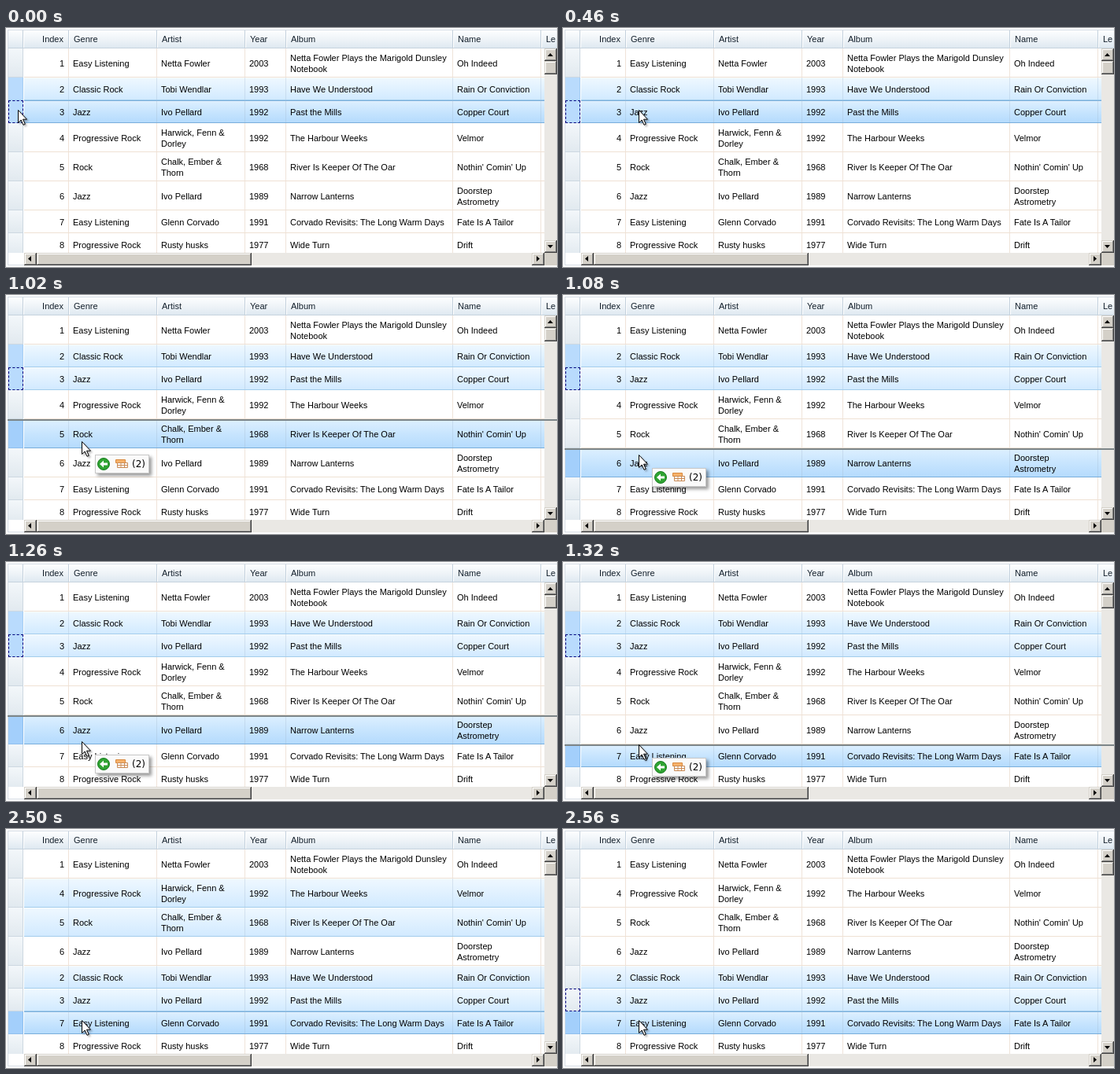
An HTML page for the animation above (3.29 s loop, 700 by 304 pixels).

```html
<!DOCTYPE html>
<html lang="en">
<head>
<meta charset="utf-8">
<title>Drag rows in a grid</title>
<style>
html, body { margin: 0; width: 100%; height: 100%; overflow: hidden; background: #fff; }
body { position: relative; font: 11px/14px "Liberation Sans", Arial, sans-serif; color: #000; }
div, span, svg { position: absolute; box-sizing: border-box; }
#frame { left: 2px; top: 2px; width: 698px; height: 300px; border: solid #d5dce4; border-width: 1px 0 1px 1px; }
#head { left: 3px; top: 3px; width: 697px; height: 23px; overflow: hidden;
  background: linear-gradient(#fdfeff, #eff4f8 50%, #dfe9f1); border-bottom: 1px solid #c6d3de; }
#head span { top: 4px; color: #14202c; }
#head i { position: absolute; top: 0; width: 2px; height: 22px; background: linear-gradient(90deg, #c3d0dc 50%, #fff 50%); }
#rows { left: 3px; top: 26px; width: 681px; height: 260px; overflow: hidden; }
.row { left: 0; width: 681px; border-bottom: 1px solid #efe1d4; }
.row span { top: 1px; bottom: -1px; display: flex; align-items: center; white-space: pre; }
.row i { position: absolute; top: 0; bottom: 0; width: 1px; background: #efe3d9; }
.sel i, .hot i, .down i { background: #a0b4c84d; }
.tab { left: 0; top: 0; bottom: -1px; width: 20px; border-right: 1px solid #fff;
  background: linear-gradient(#f3f7fa, #e1e9ef); box-shadow: inset -1px -1px #cdd8e1; }
.sel { background: linear-gradient(#eff8ff, #d2eaff); border-color: #a3cdec; box-shadow: inset 0 1px #f8fcff; }
.hot { background: linear-gradient(#def0ff, #c8e5fe 50%, #b5dbfd); border-color: #79aedb;
  box-shadow: inset 0 1px #79aedb, inset 0 2px #e4f2ff; }
.down { background: linear-gradient(#bcdcfb, #9fcefc 55%, #a0cffd); border-color: #6fa5d2;
  box-shadow: inset 0 1px #5f9bd6, inset 0 2px #c8e2fb; }
.mark .tab { background: #b9dbfd; box-shadow: inset -1px -1px #a5cdf2; }
.over .tab { background: #a3cffb; box-shadow: inset -1px -1px #8fbfee; }
.focus .tab::after { content: ""; position: absolute; inset: 0; border: 1px dashed #000080; }
.track { background: #eae8e4; }
.btn { background: #d4d0c8; box-shadow: inset -1px -1px #404040, inset 1px 1px #d4d0c8, inset -2px -2px #808080, inset 2px 2px #fff; }
#line { left: 2px; width: 698px; height: 2px; background: #7d8689; }
#badge { left: 113px; width: 69px; height: 24px; background: #fafafa; border: 1px solid #c8c8c8; box-shadow: 3px 3px 4px #0006; }
#badge span { left: 46px; top: 4px; font: 12px/15px "DejaVu Sans", sans-serif; }
svg { left: 0; top: 0; overflow: visible; }
#cursor { filter: drop-shadow(2px 2px 1px #0004); }
</style>
</head>
<body>
<div id="frame"></div>
<div id="head"></div>
<div id="rows"></div>
<div id="bars"></div>
<svg width="700" height="304">
  <path d="M688 36h7l-3.5-4zM688 276h7l-3.5 4zM32 290v7l-4-3.5zM674 290v7l4-3.5z"/>
</svg>
<div id="line"></div>
<div id="badge">
  <svg width="60" height="22">
    <circle cx="10" cy="11" r="7.5" fill="#2fa331" stroke="#187d20"/>
    <path d="M5 11l5-4.5v3h5v3h-5v3z" fill="#fff"/>
    <path d="M25.5 5.5h12v4h-12z" fill="#f6b26b" stroke="#d9883d"/>
    <path d="M27.5 9.5h13v6h-13zM27.5 12.5h13M32 9.5v6M36.5 9.5v6" fill="#fff" stroke="#c98a55"/>
  </svg>
  <span>(2)</span>
</div>
<svg id="cursor" width="14" height="22">
  <path d="M.5 .5v16l3.7-3.5 2.8 6.3 2.3-1-2.8-6.1h5z" fill="#fff" stroke="#000"/>
</svg>
<script>
const $ = id => document.getElementById(id);
const STEP = 60, LOOP = 3290;
const heads = ["Genre", "Artist", "Year", "Album", "Name", "Le"];
const edges = [79, 191, 303, 355, 567, 679];
const songs = [
  ["Easy Listening", "Netta Fowler", 2003, "Netta Fowler Plays the Marigold Dunsley\nNotebook", "Oh Indeed"],
  ["Classic Rock", "Tobi Wendlar", 1993, "Have We Understood", "Rain Or Conviction"],
  ["Jazz", "Ivo Pellard", 1992, "Past the Mills", "Copper Court"],
  ["Progressive Rock", "Harwick, Fenn &\nDorley", 1992, "The Harbour Weeks", "Velmor"],
  ["Rock", "Chalk, Ember &\nThorn", 1968, "River Is Keeper Of The Oar", "Nothin' Comin' Up"],
  ["Jazz", "Ivo Pellard", 1989, "Narrow Lanterns", "Doorstep\nAstrometry"],
  ["Easy Listening", "Glenn Corvado", 1991, "Corvado Revisits: The Long Warm Days", "Fate Is A Tailor"],
  ["Progressive Rock", "Rusty husks", 1977, "Wide Turn", "Drift"]
];
const before = [0, 1, 2, 3, 4, 5, 6, 7];
const after = [0, 3, 4, 5, 1, 2, 6, 7];

function add(parent, tag, style, text = "", cls = "") {
  const el = document.createElement(tag);
  el.style.cssText = style;
  el.textContent = text;
  el.className = cls;
  return parent.appendChild(el);
}
const box = (cls, x, y, w, h) =>
  add($("bars"), "div", `left:${x}px;top:${y}px;width:${w}px;height:${h}px`, "", cls);

// Header and rows: positions are relative to the inner left edge at x = 3
add($("head"), "span", "right:627px", "Index");
add($("head"), "i", "left:18px");
heads.forEach((text, i) => {
  add($("head"), "i", `left:${edges[i] - 3}px`);
  add($("head"), "span", `left:${edges[i] + 4}px`, text);
});

const heights = songs.map(s => s.some(v => String(v).includes("\n")) ? 37 : 29);
const rows = songs.map((song, n) => {
  const row = add($("rows"), "div", `height:${heights[n]}px`);
  add(row, "div", "", "", "tab");
  add(row, "span", "right:610px", n + 1);
  song.forEach((text, i) => add(row, "span", `left:${edges[i] + 3}px`, text));
  edges.forEach(x => add(row, "i", `left:${x - 3}px`));
  return row;
});

box("track", 684, 26, 16, 260);
box("btn", 684, 26, 16, 16);
box("btn", 684, 42, 16, 17);
box("btn", 684, 270, 16, 16);
box("track", 23, 286, 661, 16);
box("btn", 23, 286, 16, 16);
box("btn", 39, 286, 273, 16);
box("btn", 668, 286, 16, 16);
box("btn", 684, 286, 16, 16).style.boxShadow = "none";

// Pointer height at key times, linear between them
const path = [[660, 104], [720, 112], [780, 124], [900, 153], [1020, 186], [1140, 220], [1260, 228], [1500, 243]];
function pointerY(t) {
  if (t <= 660) return 104;
  const i = path.findIndex(p => p[0] >= t);
  if (i < 0) return 243;
  const [t0, y0] = path[i - 1], [t1, y1] = path[i];
  return Math.round(y0 + (y1 - y0) * (t - t0) / (t1 - t0));
}

function draw(time) {
  const t = time % LOOP;
  const y = pointerY(Math.floor(t / STEP) * STEP);
  const drag = t >= 960 && t < 2500, dropped = t >= 2500, settled = t >= 2560;
  const pressed = t >= 660 && t < 960;
  const order = dropped ? after : before;
  const selected = dropped && !settled ? [1, 2, 3, 4] : [1, 2];

  let top = 0, hot = 2, hotTop = 0;
  const tops = [];
  for (const n of order) {
    tops[n] = top;
    if ((drag || dropped) && y >= top + 26) { hot = n; hotTop = top + 26; }
    top += heights[n];
  }
  rows.forEach((row, n) => {
    const cls = ["row"];
    if (n === hot) cls.push(pressed ? "down" : "hot");
    else if (selected.includes(n)) cls.push("sel");
    if (!dropped && selected.includes(n)) cls.push("mark");
    if ((drag || dropped) && n === hot) cls.push("over");
    if (n === 2 && (!dropped || settled)) cls.push("focus");
    row.className = cls.join(" ");
    row.style.top = tops[n] + "px";
  });

  $("line").style.display = $("badge").style.display = drag ? "" : "none";
  $("line").style.top = hotTop + "px";
  $("badge").style.top = y + 17 + "px";
  $("cursor").style.left = (t < 460 ? 15 : 96) + "px";
  $("cursor").style.top = y + "px";
}

let start;
function tick(now) {
  start ??= now;
  draw(now - start);
  requestAnimationFrame(tick);
}
draw(0);
requestAnimationFrame(tick);
</script>
</body>
</html>
```
